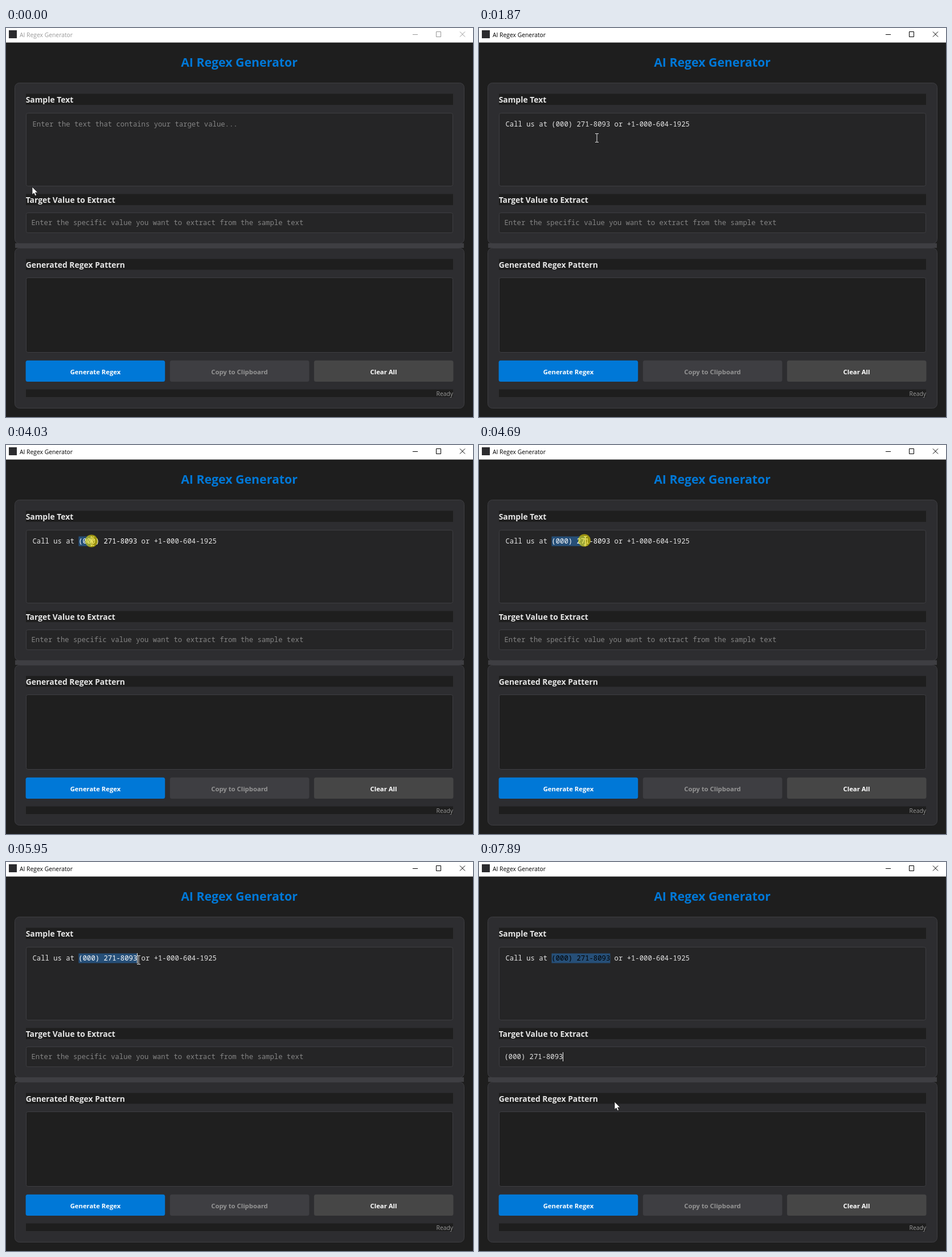
Animation, 820 px wide and 683 px high, one loop 7.99 s. Source, as an HTML page:

```html
<!DOCTYPE html>
<html lang="en">
<head>
<meta charset="utf-8">
<title>AI Regex Generator</title>
<style>
  html, body { margin: 0; width: 100%; height: 100%; overflow: hidden; background: #1e1e1e; }
  svg { display: block; width: 820px; height: 683px; }
  text { font-family: "Open Sans", "Noto Sans", sans-serif; white-space: pre; }
  .heading { font-size: 21.3px; font-weight: 700; fill: #0078d7; text-anchor: middle; }
  .label { font-size: 13.9px; font-weight: 700; fill: #e6e6e6; }
  .button { font-size: 11.3px; font-weight: 700; fill: #fff; text-anchor: middle; }
  .small { font-size: 10.35px; }
  .mono { font-family: "Noto Sans Mono", "DejaVu Sans Mono", monospace; font-size: 12.25px; fill: #e4e4e4; }
  .hint { fill: #848484; }
  .panel { fill: #2d2d30; stroke: #3e3e42; }
  .field { fill: #252526; stroke: #3e3e42; }
  .strip { fill: #1e1e1e; }
</style>
</head>
<body>
<svg viewBox="0 0 820 683">
  <rect width="820" height="683" fill="#1e1e1e"/>

  <rect width="820" height="25.5" fill="#fff"/>
  <rect x="5" y="4" width="14" height="14" fill="#2b2b2e"/>
  <text id="windowTitle" class="small" x="24" y="15.5">AI Regex Generator</text>
  <path id="windowButtons" fill="none" d="M714 11.5h9M755.5 6.5h8v9h-8zM797 6.5l9 9m0-9l-9 9"/>

  <text class="heading" x="409.5" y="68">AI Regex Generator</text>

  <rect class="panel" x="15.5" y="96.5" width="789" height="282" rx="8"/>
  <rect class="panel" x="15.5" y="386.5" width="789" height="281" rx="8"/>
  <rect x="16" y="378" width="788" height="8" fill="#3e3e42"/>

  <rect class="strip" x="35" y="115.5" width="750" height="19.5"/>
  <text class="label" x="34.7" y="131">Sample Text</text>
  <rect class="field" x="35.5" y="149.5" width="749" height="128" rx="3"/>

  <rect class="strip" x="35" y="291.5" width="750" height="19.5"/>
  <text class="label" x="34.7" y="307">Target Value to Extract</text>
  <rect class="field" x="35.5" y="324.5" width="749" height="35" rx="3"/>

  <rect class="strip" x="35" y="405.5" width="750" height="19"/>
  <text class="label" x="34.7" y="421">Generated Regex Pattern</text>
  <rect class="field" x="35.5" y="438.5" width="749" height="131" rx="3" style="fill:#1f1f1f"/>

  <rect x="34.6" y="583.7" width="244.6" height="37.2" rx="3.5" fill="#0078d7"/>
  <rect x="287.8" y="583.7" width="244.6" height="37.2" rx="3.5" fill="#3e3e42"/>
  <rect x="540.9" y="583.7" width="244.6" height="37.2" rx="3.5" fill="#464646"/>
  <text class="button" x="157" y="607.5">Generate Regex</text>
  <text class="button" x="410" y="607.5" style="fill:#949494">Copy to Clipboard</text>
  <text class="button" x="663" y="607.5">Clear All</text>

  <rect class="strip" x="35" y="634.5" width="750" height="13.5"/>
  <text class="small" x="785" y="645.5" text-anchor="end" fill="#999">Ready</text>

  <rect id="selection" x="127.5" y="160.5" height="17" fill="#264f78"/>
  <text id="sampleHint" class="mono hint" x="46.5" y="173">Enter the text that contains your target value...</text>
  <text id="sampleText" class="mono" x="46.5" y="173">Call us at <tspan id="phone">(000) 271-8093</tspan> or +1-000-604-1925</text>
  <text id="targetHint" class="mono hint" x="44.5" y="346">Enter the specific value you want to extract from the sample text</text>
  <text id="targetText" class="mono" x="44.5" y="346">(000) 271-8093</text>
  <rect id="caret" width="1" fill="#f0f0f0"/>

  <path id="beam" fill="none" stroke="#e8e8e8" d="M-3 -7.5h2.5q.5 0 .5 .5q0 -.5 .5 -.5h2.5M0 -7v14M-3 7.5h2.5q.5 0 .5 -.5q0 .5 .5 .5h2.5"/>
  <path id="arrow" fill="#fff" stroke="#111" stroke-width=".7" d="M0 0V13.6L3.1 10.8L5.2 15.6L7.5 14.6L5.5 9.9H9.8Z"/>
  <circle id="press" r="11" fill="#fff000" fill-opacity=".54"/>
</svg>
<script>
const LOOP = 7990;
const CHAR = 7.35;
const SAMPLE_X = 46.5, TARGET_X = 44.5;
const PHONE_START = 11, PHONE_END = 25, SAMPLE_LENGTH = 44;

const ACTIVATE = 600, PASTE_SAMPLE = 900;
const DRAG_START = 3420, DRAG_STOP = 5600, RELEASE = 5800;
const FOCUS_TARGET = 7080, PASTE_TARGET = 7520;
const PRESSES = [[ACTIVATE, 750], [DRAG_START, RELEASE], [FOCUS_TARGET, 7200]];

// time, x, y of the pointer
const PATH = [
  [0, 46, 279], [150, 46, 279], [600, 240, 192], [1350, 240, 192],
  [1870, 207, 193], [1970, 199, 192], [2770, 142, 174], [3100, 128, 170],
  [3560, 128, 170], [4360, 169, 169], [4690, 187, 168], [5190, 214, 169],
  [5600, 233, 172], [6120, 233, 172], [6500, 230, 232], [6900, 227, 330],
  [7000, 227, 336], [7720, 227, 336], [7890, 238, 421], [LOOP, 238, 421]
];

const el = id => document.getElementById(id);
const show = (id, on) => el(id).setAttribute("visibility", on ? "visible" : "hidden");
const set = (id, attrs) => {
  for (const name in attrs) el(id).setAttribute(name, attrs[name]);
};

function pointerAt(t) {
  const i = PATH.findIndex(point => point[0] > t);
  const [t0, x0, y0] = PATH[i - 1], [t1, x1, y1] = PATH[i];
  const k = (t - t0) / (t1 - t0);
  return [Math.round(x0 + (x1 - x0) * k), Math.round(y0 + (y1 - y0) * k)];
}

function selectionEnd(t, x) {
  if (t < DRAG_START) return PHONE_START;
  if (t >= DRAG_STOP) return PHONE_END;
  const column = Math.round((x - SAMPLE_X) / CHAR);
  return Math.max(PHONE_START, Math.min(PHONE_END, column));
}

// left edge, top and the time the blink last restarted
function caretAt(t, end) {
  if (t >= PASTE_TARGET) return [TARGET_X + 14 * CHAR, 334, PASTE_TARGET];
  if (t >= FOCUS_TARGET) return [TARGET_X, 334, FOCUS_TARGET];
  if (t >= DRAG_START) return [SAMPLE_X + end * CHAR, 160, Math.min(t, DRAG_STOP)];
  if (t >= PASTE_SAMPLE) return [SAMPLE_X + SAMPLE_LENGTH * CHAR, 160, PASTE_SAMPLE];
  return [SAMPLE_X, 160, ACTIVATE];
}

function draw(t) {
  const [x, y] = pointerAt(t);
  const active = t >= ACTIVATE;
  const end = selectionEnd(t, x);

  set("windowTitle", { fill: active ? "#000" : "#999" });
  set("windowButtons", { stroke: active ? "#000" : "#999" });

  show("sampleHint", t < PASTE_SAMPLE);
  show("sampleText", t >= PASTE_SAMPLE);
  show("targetHint", t < PASTE_TARGET);
  show("targetText", t >= PASTE_TARGET);

  set("selection", { width: (end - PHONE_START) * CHAR });
  el("phone").style.fill = t >= FOCUS_TARGET ? "#000" : t >= DRAG_START ? "#fff" : "";

  const [caretX, caretY, since] = caretAt(t, end);
  set("caret", { x: Math.round(caretX), y: caretY, height: caretY === 160 ? 18 : 16 });
  show("caret", active && (t - since) % 1060 < 530);

  set("press", { cx: x - 2, cy: y - 0.5 });
  show("press", PRESSES.some(([down, up]) => t >= down && t < up));

  const overField = (y > 149 && y < 278) || (y > 324 && y < 360);
  set("beam", { transform: `translate(${x} ${y})` });
  set("arrow", { transform: `translate(${x} ${y})` });
  show("beam", overField);
  show("arrow", !overField);
}

function tick() {
  draw(performance.now() % LOOP);
  requestAnimationFrame(tick);
}
tick();
</script>
</body>
</html>
```
